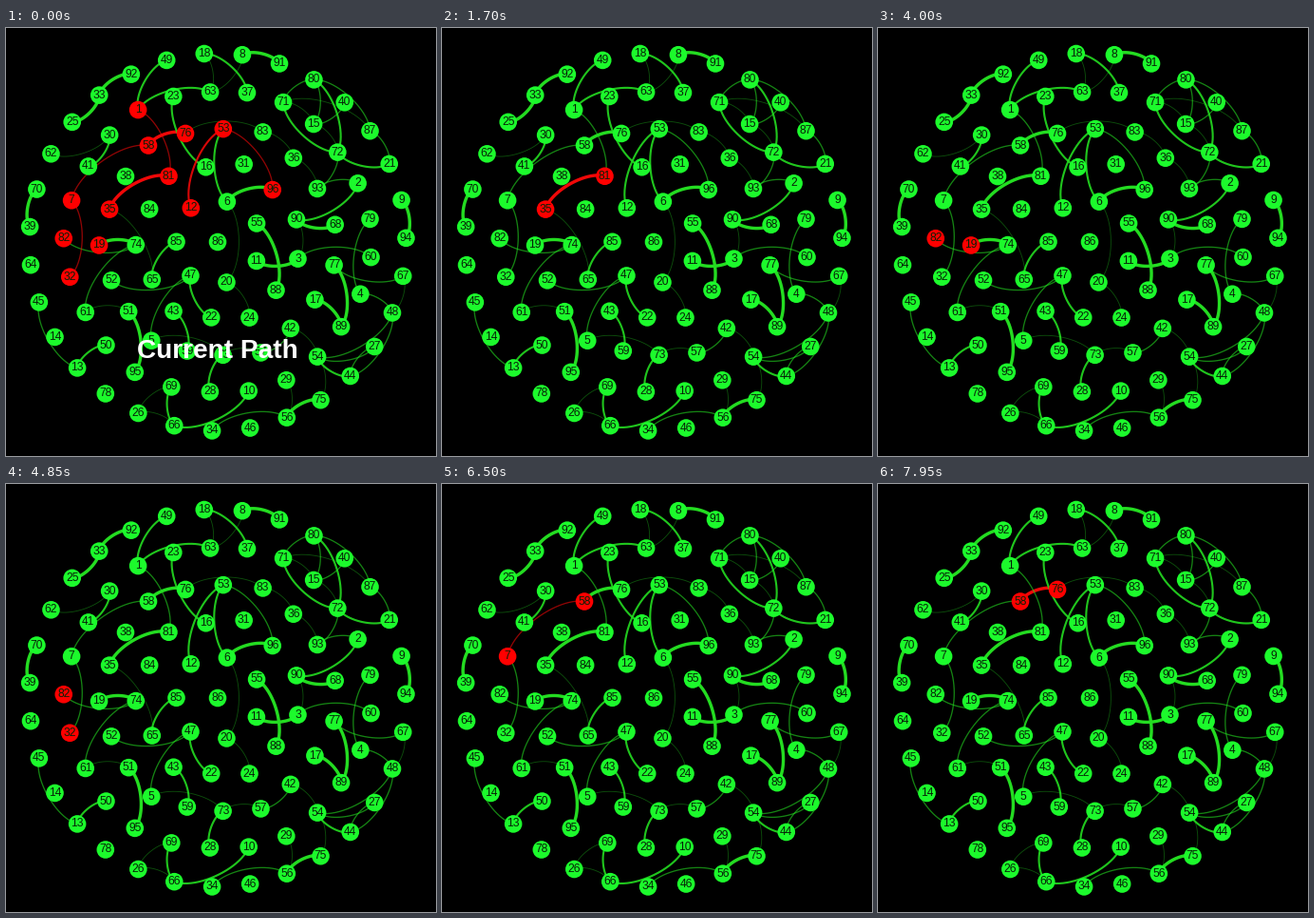
These frames come from a looping animation (453 px wide and 450 px high, 8000 ms). A matplotlib script:

```python
import numpy as np
import matplotlib.pyplot as plt
from matplotlib.animation import FuncAnimation
from matplotlib.collections import LineCollection
from matplotlib.colors import to_rgba

W, H, DPI = 453, 450, 100
STEP = 50            # ms per frame
LOOP = 8000          # ms per loop
TITLE_END = 300      # the whole path is shown until here
HOP = 1000           # ms for each hop
PX = 72 / DPI        # points per pixel
CENTER = np.array([223, 225])

GREEN, RED = "#1cfa2c", "#ff0000"
EDGE, EDGE_RED = "#24dc21", "#f00808"

PATH = [1, 81, 35, 19, 82, 32, 7, 58, 76, 12, 53, 96]

# Edge groups: (width in pixels, opacity, chains of nodes).
# Each edge bends to the left of its direction.
EDGES = [
    (3.4, 1.0, "33-92 33-25 8-91 39-70 9-94 6-96 35-81 58-76 19-74 55-88 3-11 "
               "68-90 17-89 77-89 51-95 56-75"),
    (2.1, 0.9, "1-63 1-49 18-37 16-23 30-41 12-53 6-53 65-85 22-47 43-59 28-73 "
               "66-69 13-50 10-66 2-90 80-72-71 21-72 44-54"),
    (1.3, 0.6, "4-48-54 4-79 13-45 74-82 67-77 48-44-27-54 61-74 1-81 7-58 "
               "3-60 71-80-87-21 40-15 93-2 72-93 42-57 34-56 47-52 5-47 7-32 "
               "53-96 80-15"),
    (0.9, 0.35, "6-20-24 18-63 8-63 71-15-72 71-87 76-83-36-93 30-62 35-65 "
                "90-3 61-51 42-54-75 67-48 29-56 26-66 26-69 5-73-57"),
]


def ring(labels, radius, start, wave=0, period=1, skew=0, turn=0):
    """Nodes spread round a circle with a rippled radius and uneven angles."""
    names = [int(s) for s in labels.split()]
    k = np.arange(len(names))
    a = np.radians(start + 360 / len(names) * k)
    a = a + np.radians(skew) * np.sin((a - np.radians(turn)) / 2) ** 2
    r = radius + wave * np.cos(2 * np.pi * k / period)
    return dict(zip(names, CENTER + np.c_[r * np.cos(a), r * np.sin(a)]))


def bend(a, b, curve=0.2):
    """Cubic arc from a to b."""
    along = (b - a) * curve
    side = np.array([along[1], -along[0]])
    c, d = a + along + side, b - along + side
    t = np.linspace(0, 1, 24)[:, None]
    u = 1 - t
    return u**3 * a + 3 * u * u * t * c + 3 * u * t * t * d + t**3 * b


nodes = {
    **ring("94 67 48 27 44 75 56 46 34 66 26 78 13 14 45 64 39 70 62 25 33 "
           "92 49 18 8 91 80 40 87 21 9", 198.5, -1.2),
    **ring("60 4 89 54 29 10 28 69 95 50 61 32 82 7 41 30 1 23 63 37 71 15 "
           "72 2 79", 160, 5.6, wave=2.3, period=4, skew=3.1, turn=25),
    **ring("77 17 42 57 73 59 5 51 52 19 35 38 58 76 53 83 36 93 68",
           121, 11.9, wave=4, period=3, skew=-5, turn=55),
    **ring("3 88 24 22 43 65 74 84 81 16 31 96 90", 83, 11.8,
           wave=3.3, period=2),
    **ring("11 20 47 85 12 6 55", 44.5, 26, wave=1, period=2),
    86: CENTER,
}
names = list(nodes)

pairs, widths, alphas = [], [], []
for width, alpha, chains in EDGES:
    for chain in chains.split():
        stops = [int(s) for s in chain.split("-")]
        for pair in zip(stops, stops[1:]):
            pairs.append(pair)
            widths.append(width * PX)
            alphas.append(alpha)

fig = plt.figure(figsize=(W / DPI, H / DPI), dpi=DPI, facecolor="black")
ax = fig.add_axes([0, 0, 1, 1])
ax.set(xlim=(0, W), ylim=(H, 0))
ax.axis("off")

lines = LineCollection([bend(nodes[a], nodes[b]) for a, b in pairs],
                       linewidths=widths, zorder=1)
ax.add_collection(lines)

xy = np.array([nodes[n] for n in names])
dots = ax.scatter(xy[:, 0], xy[:, 1], s=(18.6 * PX) ** 2, linewidths=0,
                  zorder=2)
for n in names:
    x, y = nodes[n]
    ax.text(x, y, str(n), color="#062006", fontsize=12 * PX,
            family="Liberation Sans", ha="center", va="center", zorder=3)

title = ax.text(223, 347, "Current Path", color="white", fontsize=28 * PX,
                family="Liberation Sans", weight="bold", ha="center",
                va="baseline", zorder=4)


def draw(i):
    t = i * STEP
    intro = t < TITLE_END
    hop = (t - TITLE_END) // HOP
    active = PATH if intro else PATH[hop:hop + 2]
    hops = {frozenset(h) for h in zip(active, active[1:])}
    lines.set_color([to_rgba(EDGE_RED if frozenset(p) in hops else EDGE, a)
                     for p, a in zip(pairs, alphas)])
    dots.set_facecolor([RED if n in active else GREEN for n in names])
    title.set_visible(intro)
    return lines, dots, title


anim = FuncAnimation(fig, draw, frames=LOOP // STEP, interval=STEP,
                     repeat=True, repeat_delay=0)
plt.show()
```
